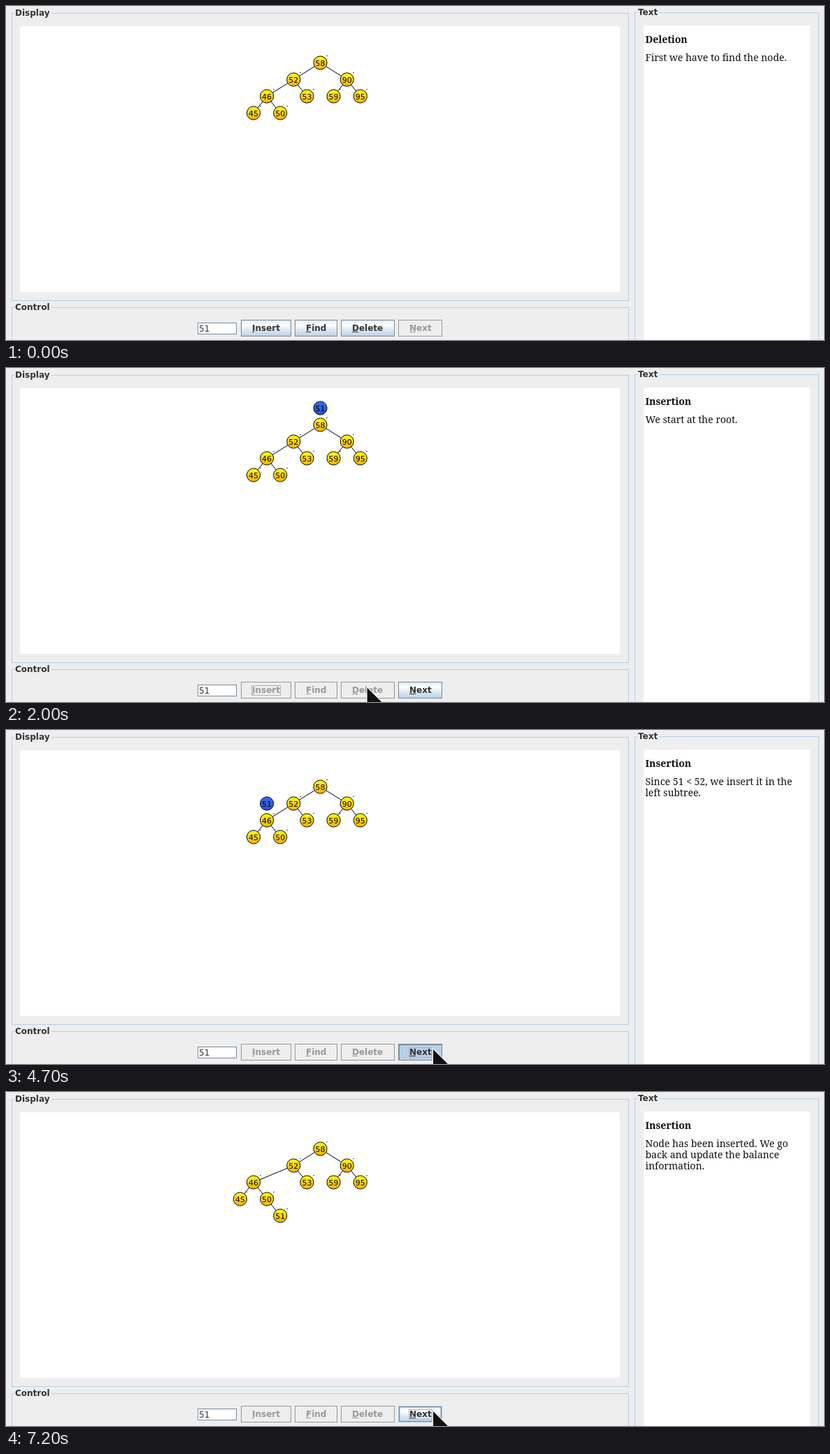
An HTML page with a canvas for the animation above (8000 ms loop, 1170x479 px).

```html
<!DOCTYPE html>
<html lang="en">
<head>
<meta charset="utf-8">
<title>Tree insertion</title>
<style>
html, body { margin: 0; overflow: hidden; background: #eee; }
canvas { display: block; }
</style>
</head>
<body>
<canvas width="1170" height="479"></canvas>
<script>
const ctx = document.querySelector('canvas').getContext('2d');
const SANS = '"DejaVu Sans", sans-serif', SERIF = '"Noto Serif", serif';
const BG = '#eee', LIGHT = '#b8cfe5', DARK = '#7a8a99', INK = '#333', GRAY = '#999';
const LOOP = 8000;

// Tree nodes: key, column, row, parent, column after the insertion
const tree = [
  [58, 0, 0], [52, -2, 1, 58], [46, -4, 2, 52, -5], [45, -5, 3, 46, -6],
  [50, -3, 3, 46, -4], [53, -1, 2, 52], [90, 2, 1, 58], [59, 1, 2, 90], [95, 3, 2, 90]
];
// Time, x, y
const newNodePath = [
  [1340, 10, 19], [1900, 449.5, 57.5], [2600, 449.5, 57.5], [3100, 411.3, 81.5],
  [3600, 411.3, 81.5], [4000, 389, 94], [4200, 373.1, 105.5], [4880, 373.1, 105.5],
  [5400, 392.2, 129.5], [6700, 392.2, 129.5], [7200, 392.2, 177.5]
];
const cursorPath = [
  [600, 388, 492], [700, 384, 475], [900, 375, 459], [1700, 375, 459], [2200, 611, 458]
];
const insertPress = [1200, 1400];
const nextPresses = [[2500, 2600], [3600, 3700], [4700, 4900], [6500, 6600]];
const messages = [
  [0, 'Deletion', 'First we have to find the node.'],
  [1400, 'Insertion', 'We start at the root.'],
  [2600, 'Insertion', 'Since 51 < 58, we insert it in the', 'left subtree.'],
  [3700, 'Insertion', 'Since 51 < 52, we insert it in the', 'left subtree.'],
  [4900, 'Insertion', 'Since 51 > 46, we insert it in the', 'right subtree.'],
  [6600, 'Insertion', 'Node has been inserted. We go', 'back and update the balance', 'information.']
];

const within = (t, [from, to]) => t >= from && t < to;

function along(path, t) {
  const i = path.findIndex(p => p[0] > t);
  if (i < 0) return path[path.length - 1].slice(1);
  if (i === 0) return path[0].slice(1);
  const a = path[i - 1], b = path[i], f = (t - a[0]) / (b[0] - a[0]);
  return [a[1] + (b[1] - a[1]) * f, a[2] + (b[2] - a[2]) * f];
}

function rect(x, y, w, h, color) {
  ctx.fillStyle = color;
  ctx.fillRect(x, y, w, h);
}

function frame(x, y, w, h, color) {
  ctx.lineWidth = 1;
  ctx.strokeStyle = color;
  ctx.strokeRect(x + .5, y + .5, w - 1, h - 1);
}

function text(string, x, y, font, color = INK, align = 'left') {
  ctx.font = font;
  ctx.fillStyle = color;
  ctx.textAlign = align;
  ctx.fillText(string, x, y);
}

function panel(title, x, y, w, h) {
  const font = 'bold 12px ' + SANS;
  frame(x, y, w, h, LIGHT);
  ctx.font = font;
  rect(x + 4, y, ctx.measureText(title).width + 3, 1, BG);
  text(title, x + 5, y + 4, font);
}

function button(label, x, w, { enabled, hover, pressed, focus }) {
  const y = 450, h = 24, font = 'bold 12px ' + SANS;
  if (enabled) {
    const fill = ctx.createLinearGradient(0, y, 0, y + h);
    fill.addColorStop(0, '#dde8f3');
    fill.addColorStop(.3, '#fff');
    fill.addColorStop(.6, '#dde8f3');
    fill.addColorStop(1, LIGHT);
    rect(x, y, w, h, pressed ? LIGHT : fill);
  }
  if (enabled && hover && !pressed) {
    frame(x, y, w, h, LIGHT);
    frame(x + 1, y + 1, w - 2, h - 2, DARK);
    frame(x + 2, y + 2, w - 4, h - 4, LIGHT);
  } else {
    frame(x, y, w, h, enabled ? DARK : GRAY);
    if (pressed) {
      rect(x, y, w, 2, DARK);
      rect(x, y, 2, h, DARK);
    }
  }
  ctx.font = font;
  const width = ctx.measureText(label).width, left = Math.round(x + (w - width) / 2);
  const color = enabled ? INK : GRAY;
  if (focus) frame(left - 1, 455, Math.round(width) + 2, 15, '#a3b8cc');
  text(label, left, 466, font, color);
  rect(left, 467, Math.round(ctx.measureText(label[0]).width) - 1, 1, color);
}

function node(key, x, y, isNew) {
  const fill = ctx.createLinearGradient(0, y - 10, 0, y + 10);
  fill.addColorStop(0, isNew ? '#2d70f2' : '#ff0');
  fill.addColorStop(1, isNew ? '#2a50d4' : '#ffae00');
  if (!isNew) rect(Math.round(x + 8.5), Math.round(y - 11), 2, 1, '#555');
  ctx.beginPath();
  ctx.arc(x, y, 9.6, 0, 7);
  ctx.fillStyle = fill;
  ctx.fill();
  ctx.strokeStyle = '#000';
  ctx.lineWidth = 1;
  ctx.stroke();
  text(key, x, y + 4, '11px ' + SANS, '#000', 'center');
}

function drawTree(t) {
  const shift = Math.min(1, Math.max(0, (t - 6700) / 500));
  const places = {}, inserted = shift > 0;
  const nodes = tree.map(([key, col, row, parent, newCol = col]) => {
    places[key] = [449.5 + (col + (newCol - col) * shift) * 19.1, 81.5 + row * 24];
    return [key, parent];
  });
  places[51] = along(newNodePath, t);
  nodes.push([51, inserted ? 50 : undefined]);

  ctx.save();
  ctx.beginPath();
  ctx.rect(20, 29, 858, 381);
  ctx.clip();
  ctx.strokeStyle = '#000';
  ctx.lineWidth = 1;
  ctx.beginPath();
  for (const [key, parent] of nodes) {
    if (!parent) continue;
    ctx.moveTo(...places[parent]);
    ctx.lineTo(...places[key]);
  }
  ctx.stroke();
  for (const [key] of nodes) node(key, ...places[key], key === 51 && !inserted);
  ctx.restore();
}

function drawCursor(x, y) {
  ctx.beginPath();
  for (const [dx, dy] of [[0, 0], [0, 29], [7, 23], [12, 34], [17, 32], [12, 22], [22, 22]])
    ctx.lineTo(x + dx, y + dy);
  ctx.closePath();
  ctx.lineWidth = 2;
  ctx.strokeStyle = '#fff';
  ctx.stroke();
  ctx.fillStyle = '#111';
  ctx.fill();
}

function draw(t) {
  const [cx, cy] = along(cursorPath, t);
  const over = (x, w) => cx >= x && cx < x + w && cy >= 450 && cy < 474;
  const started = t >= 1400;

  rect(0, 0, 1170, 479, BG);
  panel('Display', 8, 10, 883, 413);
  panel('Control', 8, 432, 883, 80);
  panel('Text', 899, 9, 264, 500);
  rect(20, 29, 858, 381, '#fff');
  rect(912, 28, 238, 451, '#fff');

  const [, heading, ...lines] = messages.filter(m => m[0] <= t).pop();
  text(heading, 914.5, 53, 'bold 14px ' + SERIF, '#111');
  lines.forEach((line, i) => text(line, 914.5, 79 + i * 16, '14px ' + SERIF, '#111'));

  drawTree(t);

  rect(274, 454, 56, 17, '#fff');
  frame(274, 454, 56, 17, DARK);
  text('51', 276, 467, '12px ' + SANS);
  button('Insert', 336, 72, {
    enabled: !started, hover: over(336, 72),
    pressed: within(t, insertPress), focus: within(t, [1200, 2500])
  });
  button('Find', 413, 61, { enabled: !started });
  button('Delete', 479, 77, { enabled: !started });
  button('Next', 561, 63, {
    enabled: started, hover: over(561, 63),
    pressed: nextPresses.some(p => within(t, p)), focus: t >= 2500
  });
  drawCursor(cx, cy);
}

function tick() {
  let t = performance.now() % LOOP;
  t -= t % (within(t, [3800, 4200]) ? 200 : 100);
  if (t === 3800 || t === 4000) t += 0;
  draw(t);
  requestAnimationFrame(tick);
}
tick();
</script>
</body>
</html>
```
